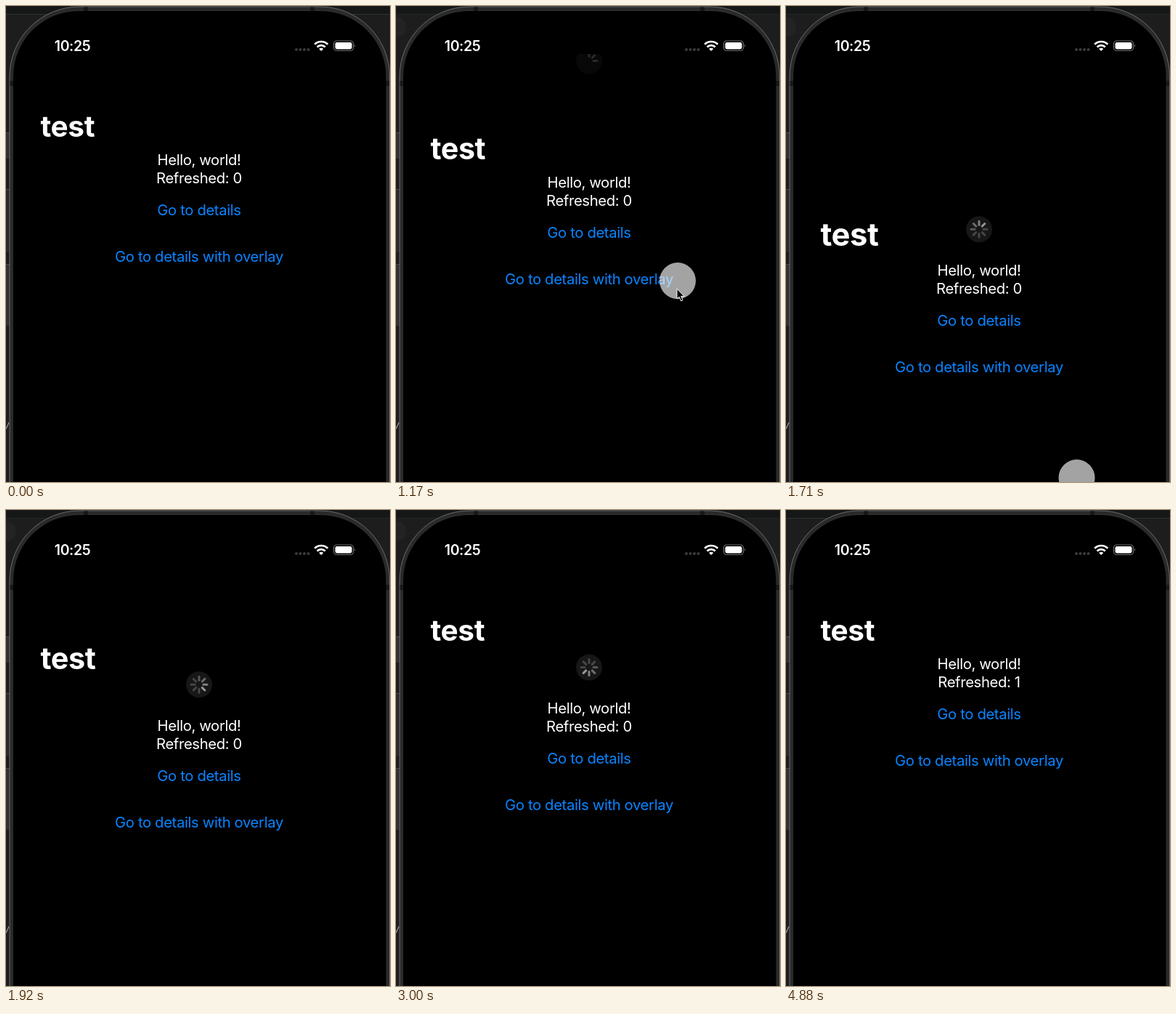
An HTML page that plays this animation: 529x655 px, repeating every 4970 ms.

```html
<!DOCTYPE html>
<html lang="en">
<head>
<meta charset="utf-8">
<title>Pull to refresh</title>
<style>
  html, body { margin: 0; height: 100%; overflow: hidden; background: #1c1c1c; }
  svg { display: block; width: 529px; height: 655px; }
  text { font: 20.3px Inter, sans-serif; letter-spacing: -.38px; fill: #fff; }
  .mid { text-anchor: middle; }
  .link { fill: #0a84ff; }
  #clock { font-size: 19.5px; font-weight: 600; letter-spacing: -.4px; }
  #title { font-size: 40.6px; font-weight: 700; letter-spacing: -.4px; }
</style>
</head>
<body>
<svg viewBox="0 0 529 655">
  <defs>
    <clipPath id="below"><rect y="66" width="529" height="589"/></clipPath>
  </defs>

  <!-- desktop behind the phone -->
  <rect width="529" height="655" fill="#1d1d1d"/>
  <rect width="529" height="11" fill="#161818"/>
  <path id="topLine" d="M0 11.5H529" stroke="#2b3334"/>
  <path id="button" d="M0 15a14 14 0 0 1 0 28z" fill="#232323"/>
  <g fill="#313131">
    <rect y="175" width="6" height="35"/>
    <rect y="253" width="6" height="85" fill="#2a2a2a"/>
    <rect y="356" width="6" height="84"/>
  </g>
  <path d="M0 174.5H5M0 252.5H5M0 355.5H5" stroke="#4c4c4c"/>
  <path d="M0 582L4 573" stroke="#999" stroke-width="1.3"/>

  <!-- phone -->
  <rect x="5" y="1" width="523.5" height="800" rx="96" fill="#2a2a2a" stroke="#6a6a6a"/>
  <path d="M107 1.5h6v6h-6zM419 1.5h6v6h-6zM5.5 103h5v7h-5zM523 103h5v7h-5z" fill="#181818"/>
  <rect x="10" y="7" width="513.5" height="800" rx="90"/>

  <!-- status bar -->
  <text id="clock" class="mid" x="91.5" y="62">10:25</text>
  <path d="M400 60h17" stroke="#3a3a3c" stroke-width="4.2" stroke-linecap="round" stroke-dasharray="0 5.5"/>
  <g fill="none" stroke="#fff" stroke-width="2.7">
    <path d="M425.2 52.8a12.6 12.6 0 0 1 18 0M428.6 56.5a7.8 7.8 0 0 1 11.2 0"/>
    <path d="M434.2 62l-3-3a4.2 4.2 0 0 1 6 0z" fill="#fff" stroke="none"/>
  </g>
  <rect x="451.5" y="48" width="27" height="13.5" rx="4.2" fill="none" stroke="#6e6e6e" stroke-width="1.2"/>
  <rect x="453.5" y="50" width="23" height="9.5" rx="2.4" fill="#fff"/>
  <path d="M480 52.5q2 2.2 0 4.5z" fill="#6e6e6e"/>

  <g id="heading"><text id="title">test</text></g>
  <g clip-path="url(#below)">
    <g id="spinner">
      <circle r="18" fill="#171717"/>
      <g id="spokes" stroke="#fff" stroke-width="3" stroke-linecap="round"></g>
    </g>
  </g>
  <g id="content" class="mid">
    <text x="266" y="219">Hello, world!</text>
    <text x="266" y="244" id="count"></text>
    <text x="266" y="288" class="link">Go to details</text>
    <text x="266" y="352" class="link">Go to details with overlay</text>
  </g>

  <circle id="touch" r="25" fill="#fff"/>
  <path id="cursor" d="M0 0V14L3.2 11.2 5.6 16.8 8 15.7 5.7 10.3H10Z" stroke="#fff"/>
</svg>
<script>
const LOOP = 4970, PRESS = 990, TRIGGER = 1440, RELEASE = 1745, DONE = 3150;
const REST = 61, START_Y = 309;
const dragPath = [
  [990, 389, 309], [1080, 388, 332], [1230, 388, 408], [1380, 389, 494],
  [1500, 391, 562], [1620, 396, 619], [1710, 400.5, 649], [1745, 401, 653]
];
const $ = id => document.getElementById(id);
const clamp = v => Math.min(1, Math.max(0, v));
const smooth = v => (v = clamp(v), v * v * (3 - 2 * v));
const mix = (a, b, k) => a + (b - a) * k;
const place = (id, x, y, scale = 1) =>
  $(id).setAttribute('transform', `translate(${x} ${y}) scale(${scale})`);
const fade = (id, alpha) => $(id).setAttribute('opacity', alpha);

for (let i = 0; i < 8; i++)
  $('spokes').innerHTML += `<path d="M0-6V-11" transform="rotate(${i * 45})"/>`;
const spokes = [...$('spokes').children];

function dragPoint(t) {
  let i = 1;
  while (i < dragPath.length - 1 && dragPath[i][0] < t) i++;
  const [t0, x0, y0] = dragPath[i - 1], [t1, x1, y1] = dragPath[i];
  const k = clamp((t - t0) / (t1 - t0));
  return [mix(x0, x1, k), mix(y0, y1, k)];
}

// Offsets of the large title and of the list below it
function offsets(t) {
  if (t < RELEASE) {
    const pull = .446 * (dragPoint(t)[1] - START_Y);
    return [pull, pull];
  }
  const peak = .446 * (dragPoint(RELEASE)[1] - START_Y);
  const decay = t < 2490 ? Math.exp((RELEASE - t) / 129) : 0;
  const rest = REST * (1 - smooth((t - DONE + 30) / 350));
  return [peak * decay, rest + (peak - REST) * decay];
}

function drawSpinner(t, pull, list) {
  const pulling = t < TRIGGER, ended = t >= DONE;
  const shrink = ended ? 1 - smooth((t - DONE) / 250) : 1;
  place('spinner', 266, pulling || ended ? 75.5 : 155.6 + list, shrink);
  fade('spinner', pulling ? clamp((pull - 15) / 45) : shrink);
  const lead = Math.floor((t - 1610) / 100) + 800;
  spokes.forEach((spoke, i) => {
    const age = (lead - i) % 8;
    const shown = clamp(pull / 80 * 8 - i);
    spoke.setAttribute('opacity', pulling ? .42 * shown : Math.max(.2, .55 - age * .09));
  });
}

function drawPointer(t) {
  const [x, y] = dragPoint(t);
  place('touch', x, y);
  fade('touch', t < PRESS ? 0 : .64 * (1 - clamp((t - RELEASE) / 120)));
  if (t < PRESS) {
    const k = smooth((t - 430) / 480);
    place('cursor', mix(424, 389, k), t < 240 ? 700 : mix(652, START_Y, k));
  } else {
    // The touch dot trails the pointer
    place('cursor', x - 1, y + 11 * clamp((t - PRESS) / 120));
  }
}

function draw() {
  const t = performance.now() % LOOP;
  const [head, list] = offsets(t);
  place('heading', 47.5, 180.3 + head * .99, 1 + head * .00047);
  place('content', 0, list);
  $('count').textContent = 'Refreshed: ' + (t < 3120 ? 0 : 1);
  drawSpinner(t, head, list);
  drawPointer(t);
  const focused = t >= 930 && t < 4880;
  fade('button', focused ? 1 : 0);
  $('topLine').setAttribute('stroke', focused ? '#242424' : '#2b3334');
  requestAnimationFrame(draw);
}
draw();
</script>
</body>
</html>
```
